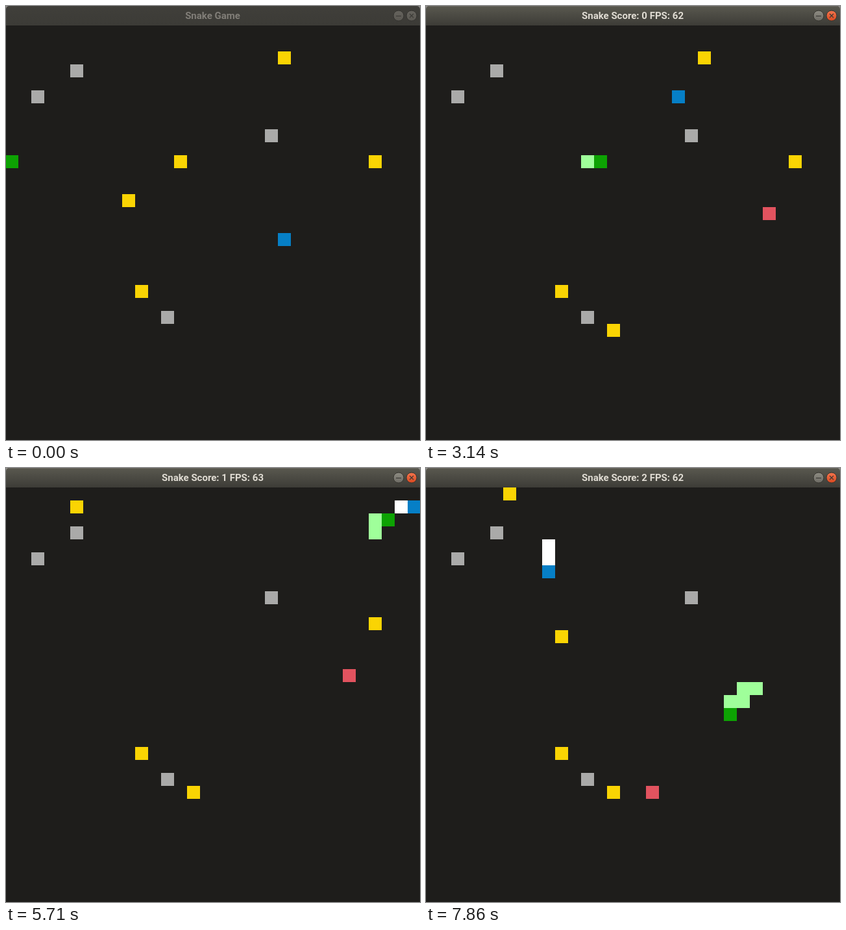
Animation of 638 by 669 pixels, one loop 8000 ms. Source, as an HTML page with a canvas:

```html
<!DOCTYPE html>
<html lang="en">
<head>
<meta charset="utf-8">
<title>Snake</title>
<style>
html, body { margin: 0; width: 100%; height: 100%; overflow: hidden; background: #1e1d1b; }
canvas { display: block; }
</style>
</head>
<body>
<canvas id="stage" width="638" height="669"></canvas>
<script>
const ctx = document.getElementById('stage').getContext('2d');
const LOOP = 8000, TICKS_PER_MS = 7 / 1000;
const YELLOW = '#fad403', RED = '#e2535f', GREY = '#aaaaa9';

const walls = [[5, 3], [2, 5], [20, 8], [12, 22]];

// x, y, first tick, tick when eaten, colour
const foods = [
  [10, 20, 0, 99, YELLOW],
  [21, 2, 0, 28, YELLOW],
  [5, 1, 28, 46, YELLOW],
  [9, 13, 0, 17, YELLOW],
  [14, 23, 17, 99, YELLOW],
  [13, 10, 0, 22, YELLOW],
  [26, 14, 22, 51, RED],
  [28, 10, 0, 46, YELLOW],
  [10, 11, 46, 99, YELLOW],
  [17, 23, 46, 99, RED],
  [6, 0, 51, 99, YELLOW]
];

// Turns a route such as "R6D" into the list of cells visited.
function walk(x, y, route) {
  const step = { L: [-1, 0], R: [1, 0], U: [0, -1], D: [0, 1] };
  const cells = [[x, y]];
  for (const [, dir, count] of route.matchAll(/([LRUD])(\d*)/g)) {
    for (let i = 0; i < (+count || 1); i++) {
      x = (x + step[dir][0] + 32) % 32;
      y += step[dir][1];
      cells.push([x, y]);
    }
  }
  return cells;
}

const pauses = [18, 27, 39];
const snakes = [
  {
    cells: walk(0, 10, 'R6DRD RDR RURURUR RU2RURURURUR2 RUR7UR D7LD D2LD LDLDLDLD'),
    meals: [12, 19, 52, 58],
    head: '#0da203', body: '#9fff9a',
    moves: tick => Math.floor(1.375 * (tick - 15) + 9.5)
  },
  {
    cells: walk(21, 16, 'L2U14R2UR20D5'),
    meals: [18, 35],
    head: '#067fc6', body: '#ffffff',
    moves: tick => tick - 8 - pauses.filter(p => p <= tick).length
  }
];

function cell([x, y], color) {
  ctx.fillStyle = color;
  ctx.fillRect(20 * x - 1, 30 + 20 * y, 20, 20);
}

function drawSnake(snake, tick) {
  const at = Math.max(0, snake.moves(tick));
  const tail = snake.meals.filter(m => m < at).length;
  for (let i = Math.max(0, at - tail); i < at; i++) cell(snake.cells[i], snake.body);
  cell(snake.cells[at], snake.head);
}

function shade(y0, y1, top, bottom) {
  const g = ctx.createLinearGradient(0, y0, 0, y1);
  g.addColorStop(0, top);
  g.addColorStop(1, bottom);
  return g;
}

function button(x, top, bottom, edge) {
  ctx.beginPath();
  ctx.arc(x, 15, 8, 0, 7);
  ctx.fillStyle = shade(7, 23, top, bottom);
  ctx.fill();
  ctx.strokeStyle = edge;
  ctx.lineWidth = 1;
  ctx.stroke();
}

function icon(color, ...lines) {
  ctx.strokeStyle = color;
  ctx.lineWidth = 1.2;
  ctx.beginPath();
  for (const [x0, y0, x1, y1] of lines) {
    ctx.moveTo(x0, y0);
    ctx.lineTo(x1, y1);
  }
  ctx.stroke();
}

// The title is refreshed once a second while playing.
function titleAt(tick) {
  if (tick < 15) return 'Snake Game';
  const score = tick < 29 ? 0 : tick < 50 ? 1 : 2;
  const fps = tick >= 36 && tick < 43 ? 63 : 62;
  return `Snake Score: ${score} FPS: ${fps}`;
}

function drawTitleBar(tick) {
  const active = tick >= 3;
  ctx.fillStyle = '#8f8d89';
  ctx.fillRect(0, 0, 638, 30);
  ctx.beginPath();
  ctx.roundRect(0, 0, 638, 30, [5, 5, 0, 0]);
  ctx.fillStyle = active ? shade(0, 30, '#59584f', '#3d3c37') : shade(0, 30, '#403f3a', '#3c3b37');
  ctx.fill();
  if (active) {
    ctx.fillStyle = '#69675f';
    ctx.fillRect(4, 0, 630, 1);
  }

  ctx.font = 'bold 15px Roboto, "Open Sans", sans-serif';
  ctx.textAlign = 'center';
  ctx.fillStyle = active ? '#dfdbd2' : '#817e78';
  ctx.fillText(titleAt(tick), 318.5, 20);

  const ink = active ? '#3a3934' : '#3c3b37';
  if (active) {
    button(605, '#8e8c83', '#6d6b64', '#36352f');
    button(625, '#f4764f', '#d9481f', '#36352f');
  } else {
    button(605, '#65635d', '#5a5852', '#343330');
    button(625, '#65635d', '#5a5852', '#343330');
  }
  icon(ink, [601, 15.5, 609, 15.5]);
  icon(ink, [622, 12, 628, 18], [628, 12, 622, 18]);
}

function draw(now) {
  const t = Math.floor((now % LOOP) / 10) * 10;
  const tick = Math.min(55, Math.floor((t + 5) * TICKS_PER_MS));
  ctx.fillStyle = '#1e1d1b';
  ctx.fillRect(0, 0, 638, 669);
  for (const w of walls) cell(w, GREY);
  for (const [x, y, from, to, color] of foods) {
    if (tick >= from && tick < to) cell([x, y], color);
  }
  for (const s of snakes) drawSnake(s, tick);
  drawTitleBar(tick);
}

const start = performance.now();
function loop() {
  draw(performance.now() - start);
  requestAnimationFrame(loop);
}
loop();
</script>
</body>
</html>
```
